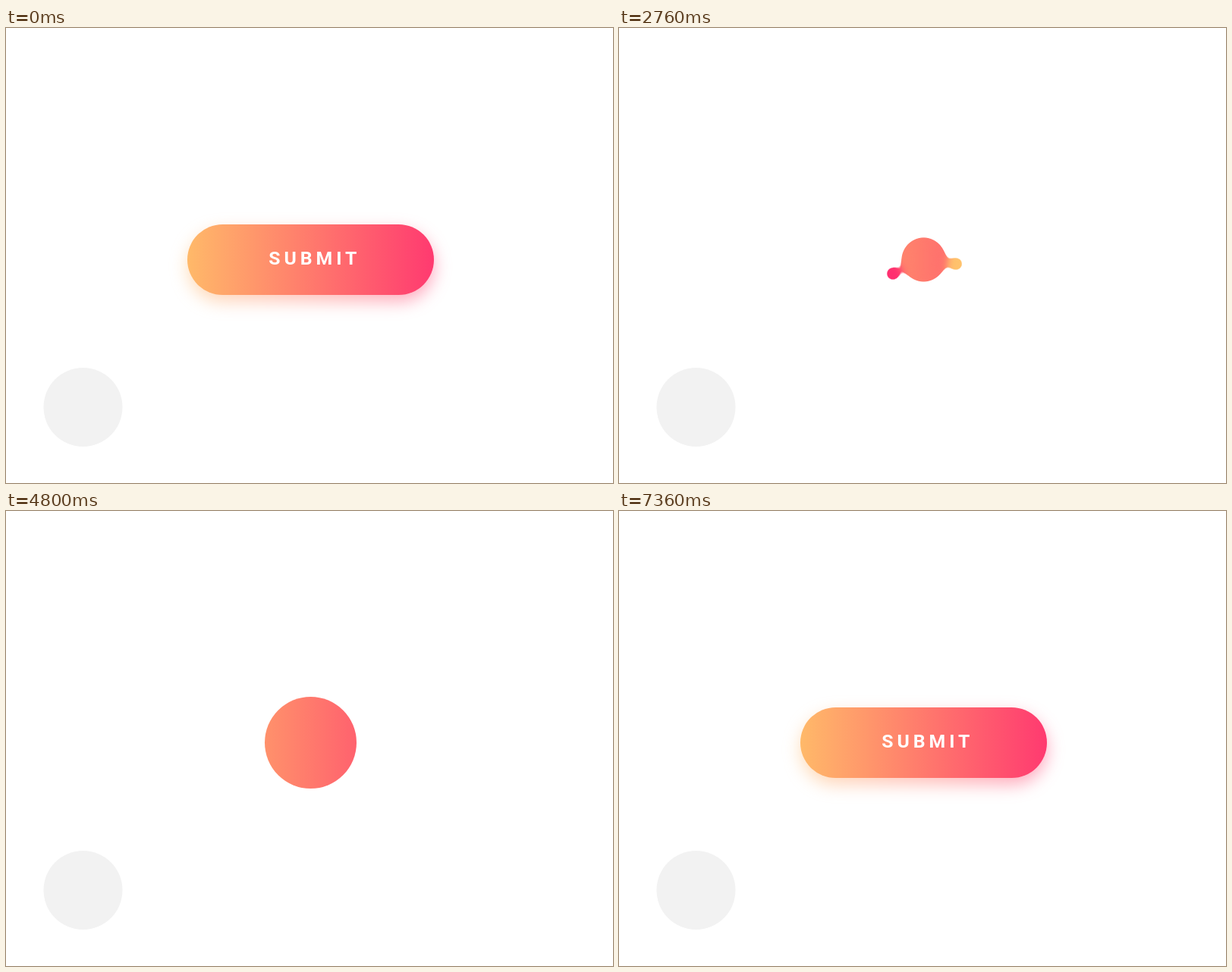
Write an HTML page that moves like this. It is 800x600 px and loops after 9040 ms.

```html
<!DOCTYPE html>
<html lang="en">
<head>
<meta charset="utf-8">
<title>Submit button</title>
<style>
  html, body { margin: 0; width: 100%; height: 100%; overflow: hidden; background: #fff; }
  svg { display: block; width: 800px; height: 600px; }
  text { font: 700 24.8px Roboto, sans-serif; letter-spacing: 4.96px; fill: #fff; }
</style>
</head>
<body>
<svg viewBox="0 0 800 600">
  <defs>
    <linearGradient id="warm" gradientUnits="userSpaceOnUse" x1="239" y1="0" x2="564" y2="0">
      <stop offset="0" stop-color="#ffb969"/>
      <stop offset="1" stop-color="#ff3a70"/>
    </linearGradient>
    <filter id="glow" filterUnits="userSpaceOnUse" x="180" y="200" width="440" height="230" color-interpolation-filters="sRGB">
      <feGaussianBlur id="glowBlur" stdDeviation="11"/>
    </filter>
    <filter id="goo" filterUnits="userSpaceOnUse" x="310" y="214" width="183" height="183" color-interpolation-filters="sRGB">
      <feGaussianBlur stdDeviation="7"/>
      <feColorMatrix values="1 0 0 0 0  0 1 0 0 0  0 0 1 0 0  0 0 0 18 -7"/>
    </filter>
    <filter id="soft" x="-60%" y="-60%" width="220%" height="220%">
      <feGaussianBlur stdDeviation="8"/>
    </filter>
    <mask id="outside" maskUnits="userSpaceOnUse" x="-70" y="-70" width="140" height="140">
      <rect x="-70" y="-70" width="140" height="140" fill="#fff"/>
      <circle r="28" fill="#000"/>
    </mask>
  </defs>

  <circle cx="101.5" cy="500" r="52" fill="#f2f2f2"/>

  <g filter="url(#glow)"><rect id="shadow" fill="url(#warm)"/></g>
  <rect id="pill" fill="url(#warm)"/>

  <g id="loader" filter="url(#goo)">
    <circle id="yellow" fill="#ffc26c"/>
    <circle id="pink" fill="#ff3070"/>
    <circle cx="401.5" cy="305.5" r="28.4" fill="url(#warm)"/>
  </g>

  <g id="label"><text x="346.2" y="312">SUBMIT</text></g>
  <path id="check" d="M385 303.3 L396.7 316.3 L422.3 298" fill="none" stroke="#fff" stroke-width="8"
        stroke-linecap="round" stroke-linejoin="miter" pathLength="1" stroke-dasharray="1 2"/>

  <g id="cursor">
    <g mask="url(#outside)"><circle cy="4" r="28" fill="#000" fill-opacity=".09" filter="url(#soft)"/></g>
    <circle r="27" fill="#f3f3f3" fill-opacity=".58" stroke="#fff" stroke-opacity=".9" stroke-width="3"/>
  </g>
</svg>

<script>
const LOOP = 9040, STEP = 40;
const CX = 401.5, CY = 305.5;
const el = id => document.getElementById(id);
const set = (id, attrs) => {
  const node = el(id);
  for (const name in attrs) node.setAttribute(name, attrs[name]);
};

const inOut = p => p < .5 ? 4 * p ** 3 : 1 - (2 - 2 * p) ** 3 / 2;
const out = p => 1 - (1 - p) ** 3;
const into = p => p * p;
const span = (t, from, to, ease = inOut) => ease(Math.min(1, Math.max(0, (t - from) / (to - from))));
const mix = (a, b, p) => a + (b - a) * p;

function pillSize(t) {
  if (t >= 6800) {
    const p = span(t, 6800, 7360);
    return [mix(76.5, 325, p), mix(76.5, 93, p)];
  }
  if (t >= 4600) {
    const d = t < 4800 ? mix(57, 121, span(t, 4600, 4800, out)) : mix(121, 76.5, span(t, 4800, 5200));
    return [d, d];
  }
  const press = mix(1, .95, span(t, 1600, 1760));
  return [
    mix(325 * press, 57, span(t, 1880, 2280)),
    mix(93 * press, 57, span(t, 2040, 2400))
  ];
}

function rounded(id, w, h, dy) {
  set(id, { x: CX - w / 2, y: CY - h / 2 + dy, width: w, height: h, rx: Math.min(w, h) / 2 });
}

function drawPill(t) {
  const [w, h] = pillSize(t);
  rounded("pill", w, h, 0);

  const back = t >= 6800;
  const hover = back ? 0 : span(t, 1000, 1320);
  const fade = back ? span(t, 6900, 7360) : 1 - span(t, 1960, 2320);
  rounded("shadow", w, h, mix(9, 3, hover));
  set("shadow", { opacity: .46 * fade });
  set("glowBlur", { stdDeviation: mix(11, 9, hover) });

  const scale = back ? mix(.82, 1, span(t, 6800, 7360)) : mix(1, .95, span(t, 1600, 1760));
  set("label", {
    opacity: back ? span(t, 7000, 7360) : 1 - span(t, 1660, 1940),
    transform: `translate(${CX} ${CY}) scale(${scale}) translate(${-CX} ${-CY})`
  });
}

// Each drop turns with a constant angular acceleration; s is ms since 2760.
const drops = {
  yellow: s => 11 + .317 * s + .000203 * s * (s - 560),
  pink: s => 151.5 + .452 * s - .000043 * s * (s - 560)
};

function drawLoader(t) {
  set("loader", { visibility: t >= 2440 && t < 4600 ? "visible" : "hidden" });
  const swell = span(t, 3880, 4200);
  const reach = span(t, 2440, 2680, out) * (1 - span(t, 4280, 4560, into));
  const radius = mix(44.8, 49.8, swell) * reach;
  for (const id in drops) {
    const a = drops[id](t - 2760) * Math.PI / 180;
    set(id, {
      cx: CX - 1.2 * (1 - swell) + radius * Math.cos(a),
      cy: CY - 3 * (1 - swell) + radius * Math.sin(a),
      r: mix(9.3, 11.5, swell)
    });
  }
}

function drawCheck(t) {
  set("check", {
    "stroke-dashoffset": 1 - span(t, 5200, 5520),
    opacity: t < 5200 ? 0 : 1 - span(t, 6800, 7040)
  });
}

function drawCursor(t) {
  const y = t < 1600 ? mix(634, 312, span(t, 1000, 1320)) : mix(312, 700, span(t, 1900, 2434));
  const scale = 1 - .1 * (span(t, 1600, 1720) - span(t, 1720, 1880));
  set("cursor", { transform: `translate(282.5 ${y}) scale(${scale})` });
}

const start = performance.now();
function frame() {
  const now = (performance.now() - start) % LOOP;
  const t = Math.floor(now / STEP) * STEP;
  drawPill(t);
  drawLoader(t);
  drawCheck(t);
  drawCursor(t);
  requestAnimationFrame(frame);
}
frame();
</script>
</body>
</html>
```
